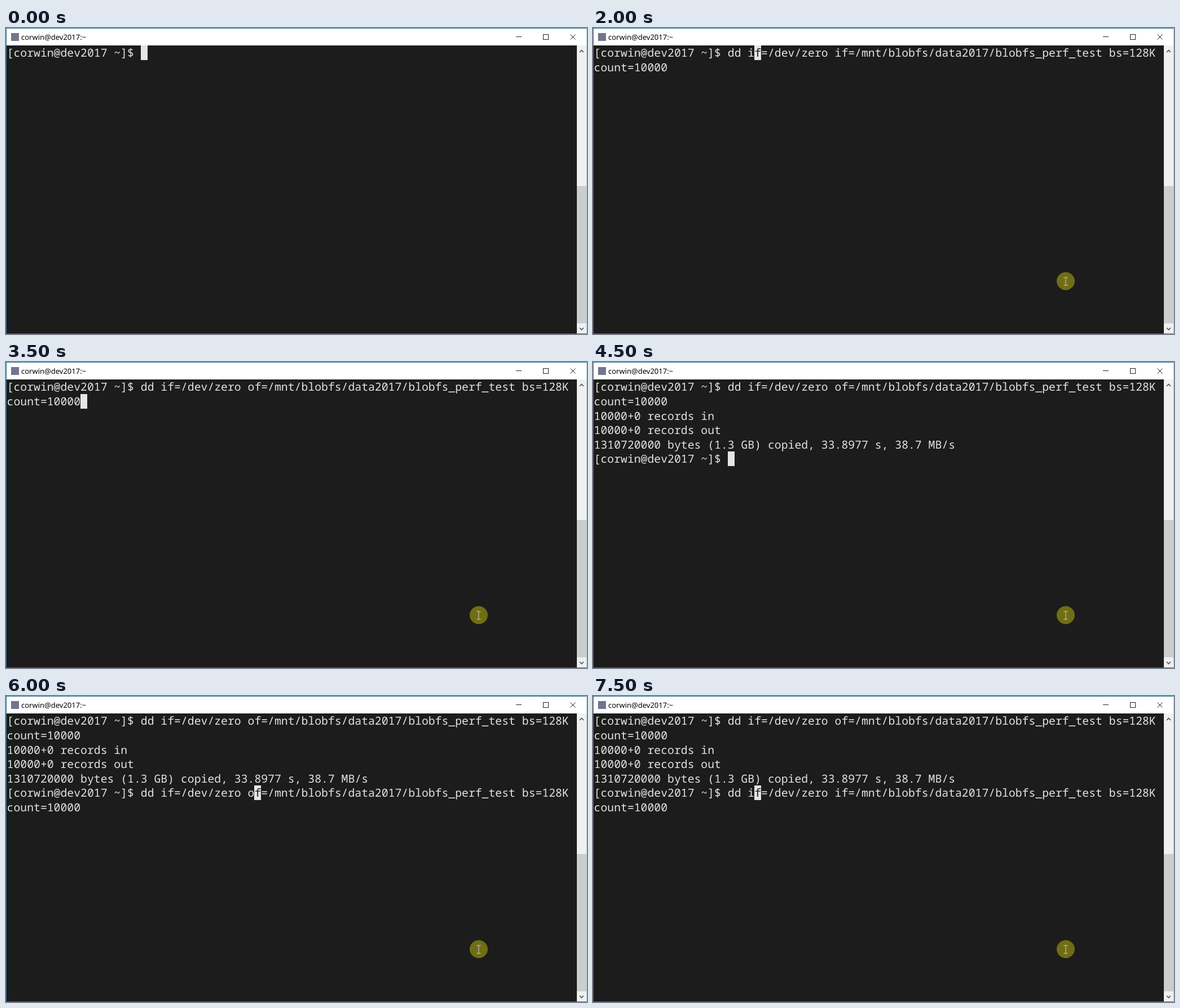
These frames come from a looping animation (1030x544 px, 8 s). An HTML page:

```html
<!DOCTYPE html>
<html lang="en">
<head>
<meta charset="utf-8">
<title>Terminal</title>
<style>
  html, body { margin: 0; width: 100%; height: 100%; overflow: hidden; }
  body { position: relative; background: #1c1c1c; }
  #title {
    position: absolute; left: 27px; top: 6px;
    font: 13px/20px "Noto Sans", "Open Sans", sans-serif; color: #000;
    white-space: pre; text-rendering: geometricPrecision;
  }
  svg { position: absolute; left: 0; top: 0; }
  #screen {
    position: absolute; left: 1.6px; top: 31.4px; margin: 0;
    font: 19.78px/25.6px "Noto Sans Mono", "DejaVu Sans Mono", monospace;
    color: #e2e2e2; white-space: pre;
    text-rendering: geometricPrecision; font-variant-ligatures: none;
  }
  #screen span {
    display: inline-block; height: 25.6px; vertical-align: top;
    background: #e5e5e5; color: #1c1c1c;
  }
</style>
</head>
<body>
<svg width="1030" height="544" viewBox="0 0 1030 544" fill="none">
  <rect x="1" y="1" width="1028" height="30" fill="#fff"/>
  <rect x="9" y="9" width="14" height="14" fill="#74748c"/>
  <g stroke="#222">
    <path d="M904 15.500h10"/>
    <rect x="952.500" y="11.500" width="9" height="9"/>
    <path d="M1000.500 11.500l9 9m0-9l-9 9"/>
  </g>
  <rect x="1012" y="31" width="17" height="512" fill="#f0f0f0"/>
  <rect x="1012" y="281" width="17" height="244" fill="#cdcdcd"/>
  <g stroke="#505050" stroke-width="1.600">
    <path d="M1017 43l3.500-3.500 3.500 3.500"/>
    <path d="M1017 533l3.500 3.500 3.500-3.500"/>
  </g>
  <path d="M1029.500 0v544" stroke="#9fc4d6"/>
  <path d="M1029 .5H.5v543H1029" stroke="#2a7192"/>
  <g id="pointer">
    <circle cx="838" cy="450" r="16" fill="#706e14"/>
    <path d="M834.500 443.500h2.500l1 1 1-1h2.500M838 444v13M834.500 457.500h2.500l1-1 1 1h2.500" stroke="#b4b4a0" stroke-width="1.300"/>
  </g>
</svg>
<div id="title">corwin@dev2017:~</div>
<pre id="screen"></pre>
<script>
  const COLS = 85, STEP = 500, LOOP = 8000;
  const PROMPT = "[corwin@dev2017 ~]$ ";
  const command = (a, b) =>
    `dd ${a}=/dev/zero ${b}=/mnt/blobfs/data2017/blobfs_perf_test bs=128K count=10000`;
  const write = command("if", "of");
  const report = [
    "10000+0 records in",
    "10000+0 records out",
    "1310720000 bytes (1.3 GB) copied, 33.8977 s, 38.7 MB/s"
  ];

  const wrap = line => line.match(new RegExp(`.{1,${COLS}}`, "g")) || [""];
  const running = wrap(PROMPT + write);
  const done = [...running, ...report];

  // Earlier rows, current input, caret column within the input (default: its end)
  const type = (input, caret = input.length, above = []) => ({
    rows: [...above, ...wrap(PROMPT + input + " ")],
    row: above.length + Math.floor((PROMPT.length + caret) / COLS),
    col: (PROMPT.length + caret) % COLS
  });
  const again = (input, caret) => type(input, caret, done);

  const steps = [
    type(""),
    type("d"),
    type("dd"),
    type(command("f", "if"), 3),
    type(command("if", "if"), 4),
    type(command("if", "f"), 16),
    type(write, 17),
    type(write),
    { rows: [...running, " "], row: running.length, col: 0 },
    again(""),
    again(""),
    again(write),
    again(write, 17),
    again(command("if", "f"), 16),
    again(command("if", "if"), 17),
    again(command("if", "if"), 4)
  ];

  const screen = document.getElementById("screen");
  const pointer = document.getElementById("pointer");
  let shown = -1;

  function show(index) {
    const { rows, row, col } = steps[index];
    const line = rows[row];
    const caret = document.createElement("span");
    caret.textContent = line[col] || " ";
    const before = [...rows.slice(0, row), line.slice(0, col)].join("\n");
    const after = [line.slice(col + 1), ...rows.slice(row + 1)].join("\n");
    screen.replaceChildren(before, caret, after);
    pointer.style.display = index ? "" : "none";
  }

  const start = performance.now();
  function tick() {
    const index = Math.floor(((performance.now() - start) % LOOP) / STEP);
    if (index !== shown) show(shown = index);
    requestAnimationFrame(tick);
  }
  tick();
</script>
</body>
</html>
```
